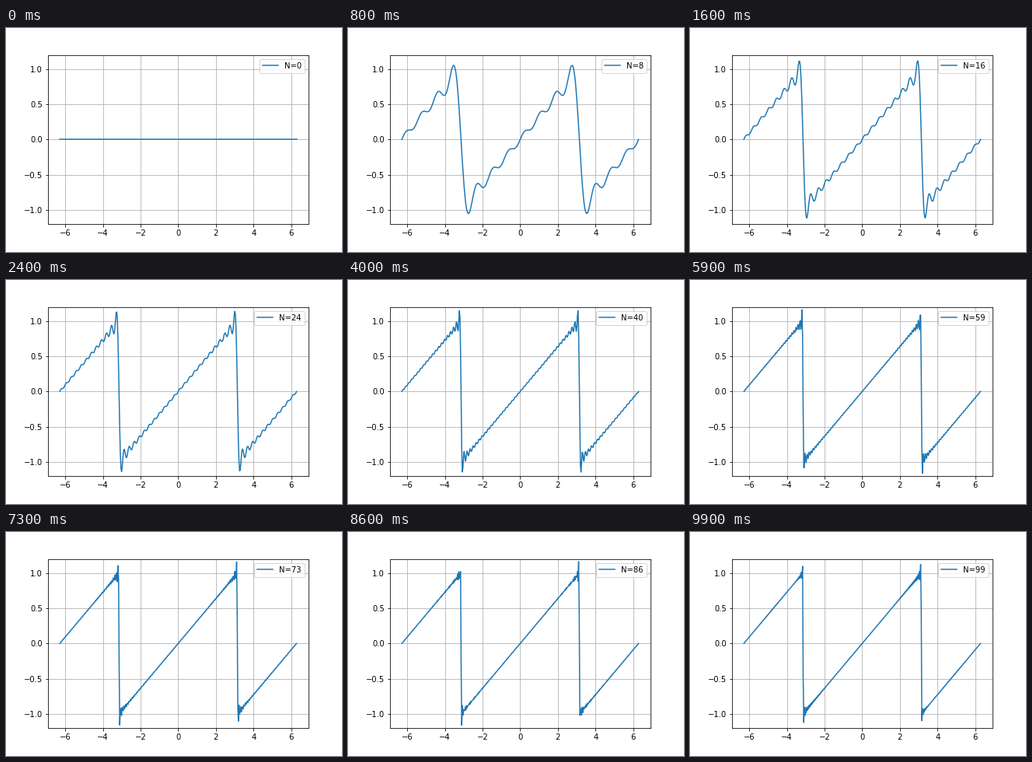
Write a matplotlib script that moves like this. It is 432 px wide and 288 px high and loops after 10000 ms.

```python
import numpy as np
import matplotlib.pyplot as plt
from matplotlib.animation import FuncAnimation

FRAMES = 100
x = np.linspace(-2 * np.pi, 2 * np.pi, 400)


def sawtooth(terms):
    """Partial Fourier sum of a sawtooth wave with period 2*pi."""
    y = np.zeros_like(x)
    for n in range(1, terms):
        y += 2 / np.pi * (-1) ** (n + 1) * np.sin(n * x) / n
    return y


fig, ax = plt.subplots(figsize=(6, 4), dpi=72)
fig.subplots_adjust(left=0.125, right=0.9, bottom=0.125, top=0.88)
line, = ax.plot(x, sawtooth(0), label="N=0")
ax.set_ylim(-1.2, 1.2)
ax.grid()
label = ax.legend(loc="upper right").get_texts()[0]


def update(n):
    line.set_ydata(sawtooth(n))
    label.set_text(f"N={n}")
    return line, label


anim = FuncAnimation(fig, update, frames=FRAMES, interval=100,
                     repeat=True, repeat_delay=0)
plt.show()
```
